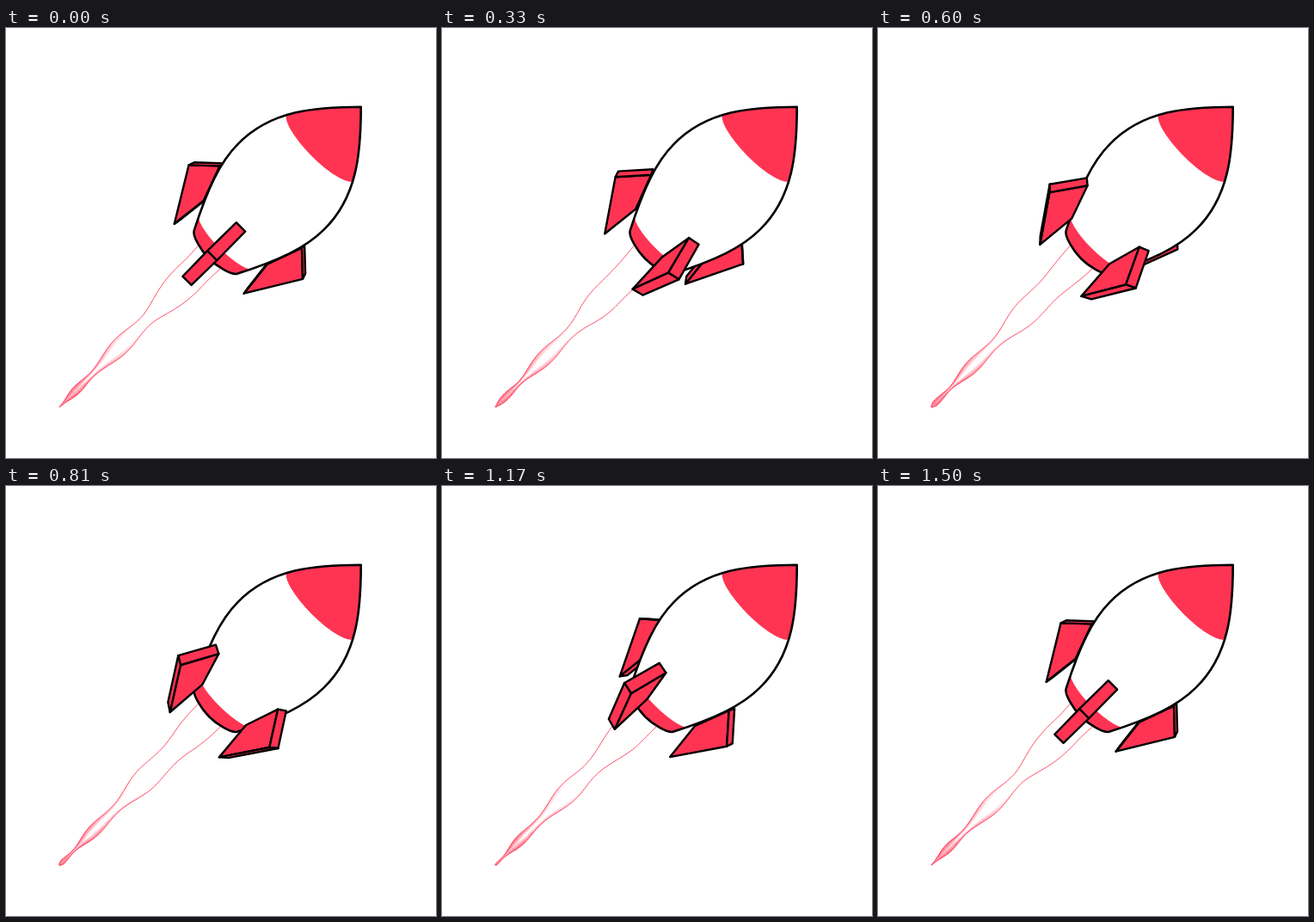
These frames come from a looping animation (500 by 500 pixels, 1.53 s). An HTML page with a canvas:

```html
<!DOCTYPE html>
<html lang="en">
<head>
<meta charset="utf-8">
<title>Rocket</title>
<style>
  html, body { margin: 0; width: 100%; height: 100%; overflow: hidden; background: #fff; }
  canvas { display: block; width: 500px; height: 500px; }
</style>
</head>
<body>
<canvas id="stage" width="500" height="500"></canvas>
<script>
const ctx = document.getElementById('stage').getContext('2d');
const RED = '#ff3453', INK = '#000';
const LOOP = 1530, STEP = 30, TURN_STEPS = 50;
const clamp = v => Math.max(0, Math.min(1, v));

// Local space: x runs along the rocket towards the nose, y across it.
const body = new Path2D(
  'M227 0C190 -37 150 -71.5 95 -70.5C66 -70.5 34 -59 -12 -35.4' +
  'C-18 -32.3 -22.7 -13 -22.7 0C-22.7 13 -18 32.3 -12 35.4' +
  'C34 59 66 70.5 95 70.5C150 71.5 190 37 227 0Z');

// Fin profile as [along axis, radius]: root front, outer front, trailing tip, root back.
const FIN = [[65.5, 66.5], [41, 92.5], [-18.5, 56.5], [24, 51.5]];
const HALF_FIN = 6.4, TILT = 0.6, DEPTH = 510;

function project([x, r], side, angle) {
  const sin = Math.sin(angle), cos = Math.cos(angle), h = side * HALF_FIN;
  const z = r * cos - h * sin;
  const scale = 1 / (1 - z / DEPTH);
  return [(x - TILT * z) * scale, (r * sin + h * cos) * scale];
}

function facesViewer(points) {
  let area = 0;
  points.forEach(([x, y], i) => {
    const [nx, ny] = points[(i + 1) % points.length];
    area += x * ny - nx * y;
  });
  return area < 0;
}

function drawFin(angle) {
  const right = FIN.map(p => project(p, 1, angle));
  const left = FIN.map(p => project(p, -1, angle));
  const faces = [right, [...left].reverse()];
  FIN.forEach((_, i) => {
    const j = (i + 1) % FIN.length;
    faces.push([right[j], right[i], left[i], left[j]]);
  });
  ctx.lineWidth = 2.4;
  for (const face of faces.filter(facesViewer)) {
    ctx.beginPath();
    face.forEach(p => ctx.lineTo(...p));
    ctx.closePath();
    ctx.fill();
    ctx.stroke();
  }
}

function drawBody() {
  ctx.save();
  ctx.fillStyle = '#fff';
  ctx.fill(body);
  ctx.clip(body);
  ctx.fillStyle = RED;
  redEnd(161.5, 15.5, 55.5, 240);
  redEnd(7, 12.5, 46, -40);
  ctx.restore();
  ctx.lineWidth = 2.6;
  ctx.stroke(body);
}

function redEnd(x, rx, ry, farX) {
  ctx.beginPath();
  ctx.ellipse(x, 0, rx, ry, 0, Math.PI / 2, Math.PI * 1.5);
  ctx.lineTo(farX, -ry);
  ctx.lineTo(farX, ry);
  ctx.fill();
}

const FLAME_START = -10, FLAME_END = -268, FLAME_MID = -1;

// Ripples run down the flame and crowd together near its tip.
function flameWidth(x, phase) {
  const u = (102 - Math.sqrt(102 ** 2 + 64 * (125 + x))) / 32;
  const pinch = 0.5 + 0.5 * Math.cos(2 * Math.PI * (u - phase));
  const depth = 0.5 * clamp((-24 - x) / 100) + 0.3 * clamp((-200 - x) / 65);
  const envelope = Math.min(18.5, 3 + (x + 262) * 0.076);
  return envelope * (1 - depth * pinch) * Math.sqrt(clamp((x - FLAME_END) / 6));
}

function drawFlame(phase) {
  const tint = a => `rgba(255,52,83,${a})`;
  for (let x = -130; x > FLAME_END; x--) {
    const w = flameWidth(x, phase);
    if (w < 0.2) continue;
    const heat = clamp((-130 - x) / 100);
    const soft = 0.1 + 0.38 * heat;
    const core = 0.55 * clamp((-220 - x) / 40);
    const g = ctx.createLinearGradient(0, FLAME_MID - w, 0, FLAME_MID + w);
    g.addColorStop(0, tint(0.9 * heat));
    g.addColorStop(soft, tint(core));
    g.addColorStop(1 - soft, tint(core));
    g.addColorStop(1, tint(0.9 * heat));
    ctx.fillStyle = g;
    ctx.fillRect(x - 1, FLAME_MID - w, 1, 2 * w);
  }
  ctx.beginPath();
  for (const side of [-1, 1]) {
    ctx.moveTo(FLAME_START, FLAME_MID + side * flameWidth(FLAME_START, phase));
    for (let x = FLAME_START; x >= FLAME_END; x--) {
      ctx.lineTo(x, FLAME_MID + side * flameWidth(x, phase));
    }
  }
  ctx.strokeStyle = RED;
  ctx.lineWidth = 0.9;
  ctx.stroke();
}

function draw(now) {
  const phase = Math.floor((now % LOOP) / STEP) / TURN_STEPS;
  const fins = [0, 1, 2, 3]
    .map(i => (i + phase) * Math.PI / 2)
    .sort((a, b) => Math.cos(a) - Math.cos(b));
  const inFront = a => Math.cos(a) > 0.15;

  ctx.setTransform(1, 0, 0, 1, 0, 0);
  ctx.fillStyle = '#fff';
  ctx.fillRect(0, 0, 500, 500);
  ctx.translate(252.2, 252.2);
  ctx.rotate(-Math.PI / 4);
  ctx.lineJoin = 'round';

  drawFlame(phase);
  ctx.fillStyle = RED;
  ctx.strokeStyle = INK;
  fins.filter(a => !inFront(a)).forEach(drawFin);
  drawBody();
  fins.filter(inFront).forEach(drawFin);
}

const start = performance.now();
function tick() {
  draw(performance.now() - start);
  requestAnimationFrame(tick);
}
tick();
</script>
</body>
</html>
```
